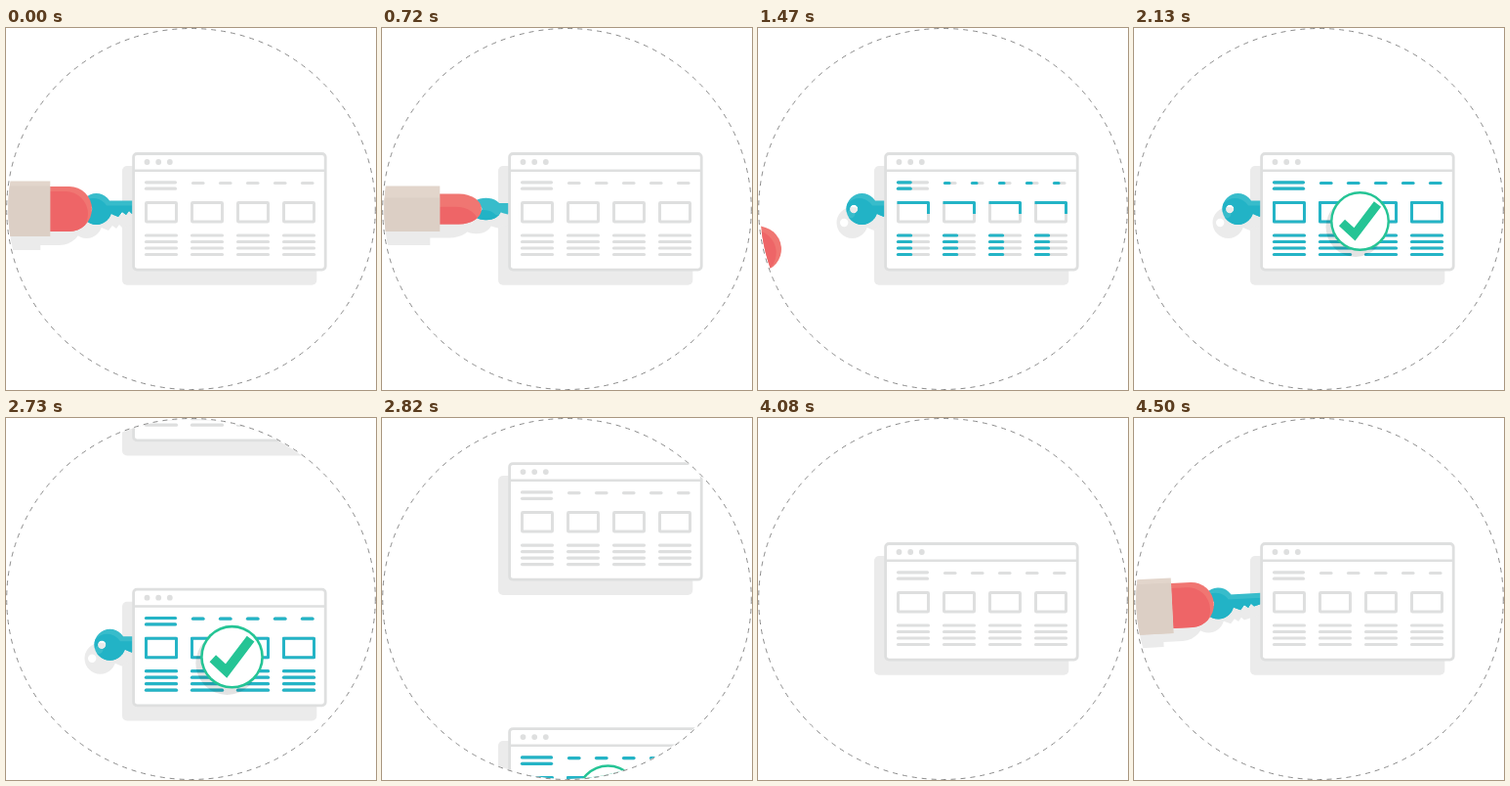
These frames come from a looping animation (379x370 px, 4530 ms). An HTML page with a canvas:

```html
<!DOCTYPE html>
<html lang="en">
<head>
<meta charset="utf-8">
<title>Key unlocks page</title>
<style>
  html, body { margin: 0; width: 100%; height: 100%; overflow: hidden; background: #fff; }
  canvas { display: block; }
</style>
</head>
<body>
<canvas id="stage" width="379" height="370"></canvas>
<script>
const ctx = document.getElementById('stage').getContext('2d');
const LOOP = 4530;
const GREY = '#dedfdf', SHADOW = '#ebebeb', TEAL = '#24b4c6', GREEN = '#25c495';
const COLUMNS = [142, 189, 236, 283];
const AXIS = 185;

const sleeve = new Path2D('M-80 156.5H45.3V213H-80Z');
const fist = new Path2D('M45 162H65A23 23 0 0 1 65 208H45Z');
const blade = 'M100 176.5H150V184L129 190L126 187L123 191L119 188L115 193L110 191L106 189H100Z';
const ring = new Path2D('M76.5 185a16 16 0 1 1 32 0a16 16 0 1 1 -32 0Z M80 185a4.2 4.2 0 1 0 8.4 0a4.2 4.2 0 1 0 -8.4 0Z');
const keyPath = new Path2D(blade);
keyPath.addPath(ring);

const clamp = v => Math.min(1, Math.max(0, v));
const span = (t, from, to) => clamp((t - from) / (to - from));
const sine = u => (1 - Math.cos(Math.PI * u)) / 2;

function track(t, steps) {
  for (let i = 1; i < steps.length; i++) {
    const [t0, a] = steps[i - 1], [t1, b] = steps[i];
    if (t < t1) return a + (b - a) * sine(span(t, t0, t1));
  }
  return steps[steps.length - 1][1];
}

function scoped(draw) {
  ctx.save();
  draw();
  ctx.restore();
}

function line(points, color, width) {
  ctx.beginPath();
  points.forEach(([x, y]) => ctx.lineTo(x, y));
  ctx.strokeStyle = color;
  ctx.lineWidth = width;
  ctx.stroke();
}

function disc(x, y, r, fill) {
  ctx.beginPath();
  ctx.arc(x, y, r, 0, 2 * Math.PI);
  ctx.fillStyle = fill;
  ctx.fill();
}

function roundBox(x, y, w, h, r) {
  ctx.beginPath();
  ctx.roundRect(x, y, w, h, r);
}

// A light shape with its darker copy shifted inside it
function shaded(path, light, dark, dx, dy) {
  scoped(() => {
    ctx.fillStyle = light;
    ctx.fill(path);
    ctx.clip(path);
    ctx.translate(dx, dy);
    ctx.fillStyle = dark;
    ctx.fill(path);
  });
}

function place(pose, squeeze) {
  ctx.translate(65 + pose.x, AXIS + pose.y);
  ctx.rotate(pose.angle);
  ctx.scale(1, squeeze);
  ctx.translate(-65, -AXIS);
}

function handPose(t) {
  if (t >= 4320) {
    const e = Math.pow(1 - span(t, 4320, LOOP), 1.56);
    return { x: -135 * e, y: 66 * Math.pow(e, .78), angle: -.45 * Math.pow(e, .7) };
  }
  const pull = 111 * Math.pow(span(t, 1110, 1560), 1.6);
  const drop = Math.pow(pull / 78, 2);
  return { x: 14 * sine(span(t, 150, 360)) - pull, y: 41 * drop, angle: .3 * drop };
}

function keyPose(t) {
  return t >= 4320 ? handPose(t) : handPose(Math.min(t, 1110));
}

function drawHandAndKey(t, turn) {
  const hand = handPose(t), key = keyPose(t);
  const handVisible = t < 1620 || t >= 4320;
  const sleeveSqueeze = 1 - .18 * turn, fistSqueeze = 1 - .34 * turn, keySqueeze = 1 - .31 * turn;
  const part = (path, pose, squeeze, paint) => scoped(() => {
    place(pose, squeeze);
    paint(path);
  });
  const flat = path => { ctx.fillStyle = SHADOW; ctx.fill(path); };

  scoped(() => {
    ctx.translate(-10, 14);
    part(keyPath, key, keySqueeze, flat);
    if (handVisible) {
      part(sleeve, hand, sleeveSqueeze, flat);
      part(fist, hand, fistSqueeze, flat);
    }
  });
  part(keyPath, key, keySqueeze, p => shaded(p, '#38bccb', '#22b3c6', -3, 5 + 13 * turn));
  if (handVisible) {
    part(fist, hand, fistSqueeze, p => shaded(p, '#f07672', '#ee6567', -4, 5 + 15 * turn));
    part(sleeve, hand, sleeveSqueeze, p => shaded(p, '#e2d5cb', '#dccfc5', 0, 5 + 10 * turn));
  }
}

function drawBar(x, y, w, p) {
  ctx.lineCap = 'round';
  line([[x, y], [x + w, y]], GREY, 3.2);
  if (p > 0) line([[x, y], [x + w * p, y]], TEAL, 3.2);
}

function drawFrame(x, p) {
  ctx.lineCap = 'butt';
  ctx.strokeStyle = GREY;
  ctx.lineWidth = 3;
  roundBox(x + 1.5, 178.5, 31, 19.5, .8);
  ctx.stroke();
  if (p <= 0) return;
  scoped(() => {
    ctx.lineJoin = 'round';
    ctx.setLineDash([103 * p, 300]);
    const l = x + 1.5, r = x + 32.5;
    line([[l - 1, 178.5], [r, 178.5], [r, 198], [l, 198], [l, 177.5]], TEAL, 3);
  });
}

function drawPanel(p) {
  ctx.fillStyle = '#fff';
  ctx.strokeStyle = GREY;
  ctx.lineWidth = 2.8;
  roundBox(130.6, 128.5, 196.6, 118.6, 3.5);
  ctx.fill();
  ctx.stroke();
  ctx.lineCap = 'butt';
  line([[130, 145.7], [328, 145.7]], GREY, 2.5);
  [144.5, 156.2, 167.8].forEach(x => disc(x, 137, 2.9, GREY));

  [157.8, 164.2].forEach(y => drawBar(143.5, y, 30, p));
  for (let i = 0; i < 5; i++) drawBar(191.5 + 28 * i, 158.5, 10.5, p);
  for (const x of COLUMNS) {
    drawFrame(x, p);
    for (let row = 0; row < 4; row++) drawBar(x + 1.5, 212 + 6.5 * row, 31, p);
  }
}

function drawCheck(scale) {
  if (scale <= 0) return;
  scoped(() => {
    ctx.translate(231.5, 197.5);
    ctx.scale(scale, scale);
    disc(-5, 6.5, 32.2, 'rgba(0,0,0,.11)');
    disc(0, 0, 32.4, GREEN);
    disc(0, 0, 29.8, '#fff');
    ctx.lineCap = 'butt';
    ctx.lineJoin = 'miter';
    line([[-19.7, 1.6], [-5.9, 14.3], [19.1, -18.6]], GREEN, 9.6);
  });
}

function drawScene(offset, progress, check, drawKey) {
  scoped(() => {
    ctx.translate(0, offset);
    ctx.fillStyle = SHADOW;
    roundBox(119, 141, 199.3, 121.8, 5);
    ctx.fill();
    if (drawKey) drawKey();
    drawPanel(progress);
    drawCheck(check);
  });
}

function ellipse(rx, ry) {
  ctx.beginPath();
  ctx.ellipse(189.5, 185, rx, ry, 0, 0, 2 * Math.PI);
}

function render(t) {
  ctx.fillStyle = '#fff';
  ctx.fillRect(0, 0, 379, 370);

  const turn = track(t, [[570, 0], [740, 1], [930, 0]]);
  const progress = sine(span(t, 930, 2130));
  const check = track(t, [[1950, 0], [2130, .94], [2220, 1.05], [2370, 1]]);
  const handAndKey = () => drawHandAndKey(t, turn);

  scoped(() => {
    ellipse(187.3, 184);
    ctx.clip();
    if (t < 2714) {
      drawScene(0, progress, check, handAndKey);
    } else {
      const end = Math.exp(-5.2);
      const left = 271 * (Math.exp(-5.2 * span(t, 2714, 3184)) - end) / (1 - end);
      if (t < 3184) drawScene(271 - left, 1, 1, handAndKey);
      drawScene(-left, 0, 0, t >= 4320 && handAndKey);
    }
  });

  scoped(() => {
    ellipse(188.8, 184.5);
    ctx.setLineDash([5, 5]);
    ctx.strokeStyle = '#8c8c8c';
    ctx.lineWidth = 1;
    ctx.stroke();
  });
}

const start = performance.now();
function tick() {
  render((performance.now() - start) % LOOP);
  requestAnimationFrame(tick);
}
tick();
</script>
</body>
</html>
```
